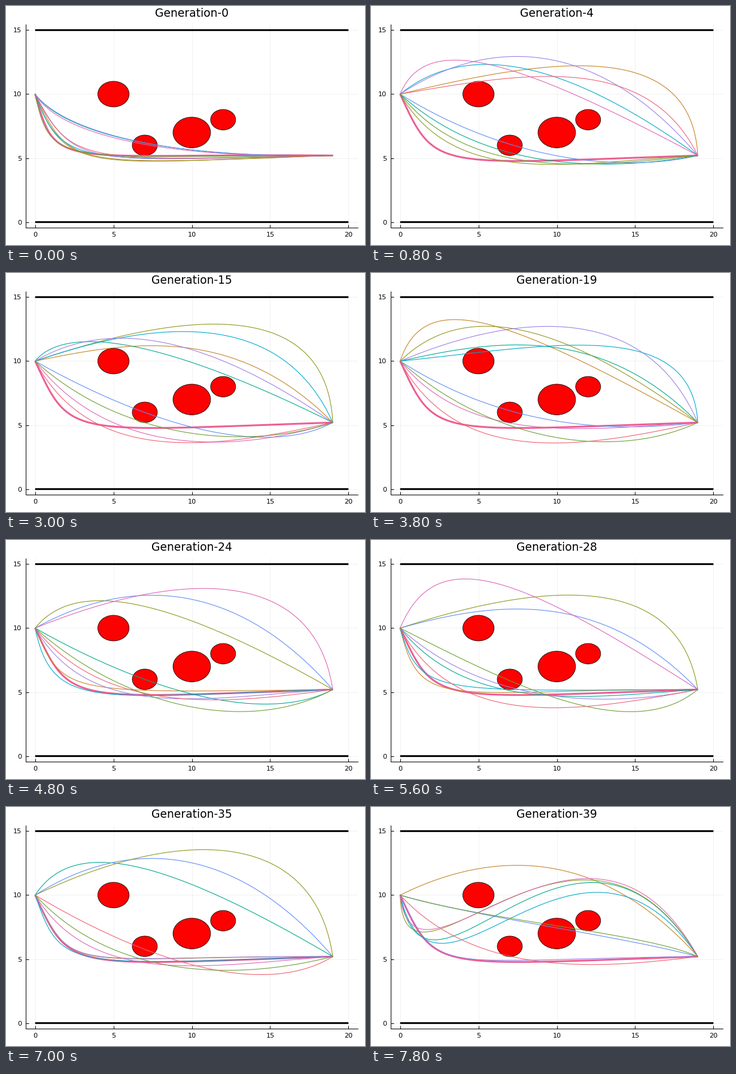
A matplotlib script for the animation above (8 s loop, 600 px wide and 400 px high).

```python
import numpy as np
import matplotlib.pyplot as plt
from matplotlib.animation import FuncAnimation
from matplotlib.patches import Circle

W, H, DPI = 600, 400, 100
GENERATIONS, STEP_MS = 40, 200
START, GOAL = (0, 10), (19, 5.2)
OBSTACLES = [(5, 10, 1), (7, 6, 0.8), (10, 7, 1.2), (12, 8, 0.8)]

BEST_COLOR = "#ED5E93"
COLORS = ["#C68225", "#00A98D", "#8E971E", "#00A9CC", "#9B7FE9",
          "#618DF6", "#F06073", "#DD65B6", "#6C9F33"]

# Each path is a cubic curve, given by its inner control points a, b, c, d.
FIRST_BEST = (1.4, 3.9, 1.3, 5.4)
BEST = (2.3, 3.9, 2.0, 4.5)

# Kinds of path: High and Low arcs, Near the best, Gentle, Straight, Wavy.
# A mix names the kind of each colour and holds until the next one.
MIXES = {0: "NGNNNGNGN", 1: "HLLHHLHHL", 8: "LLHHHHLHL", 15: "HHHHHLLLL",
         24: "NLHNLHLHL", 32: "NHHNNHLLL", 37: "HWWWNSLWS"}

# Ranges of the turning point (x, y) of an arc.
ARCS = {"H": ((2.5, 12.4), (11.2, 13.9)), "L": ((9, 15.5), (3.4, 4.9))}

# Lowest and highest control points of the other kinds.
RANGES = {"N": ((0.4, 3.2, 1.5, 4.4), (2.6, 4.8, 3.8, 5.3)),
          "G": ((1.2, 7.2, 6.8, 4.9), (1.5, 7.6, 7.0, 5.0)),
          "S": ((5.0, 8.0, 12.0, 6.8), (5.2, 9.9, 15.8, 9.7)),
          "W": ((0.0, -2.0, 11.0, 18.9), (3.0, 0.5, 12.9, 21.0))}

plt.rcParams["font.family"] = "DejaVu Sans"


def px(n):
    """Pixels to points."""
    return n * 72 / DPI


def bernstein(t):
    u = 1 - t
    return np.array([u ** 3, 3 * u * u * t, 3 * u * t * t, t ** 3])


def arc(kind, x, y):
    """Control points of a path whose highest or lowest point is (x, y)."""
    if kind == "H":
        t, c = 0.36 + 0.006 * x, min(1.1 + 1.55 * x, 18.6)
    else:
        t, c = 0.35 + 0.025 * x, 3.7 + 0.75 * x
    u = 1 - t
    w0, w1, w2, w3 = bernstein(t)
    a = (x - w2 * c - w3 * GOAL[0]) / w1
    # The curve passes y at t, and its slope is zero there.
    b, d = np.linalg.solve(
        [[w1, w2], [u * u - 2 * u * t, 2 * u * t - t * t]],
        [y - w0 * START[1] - w3 * GOAL[1], START[1] * u * u - GOAL[1] * t * t])
    return a, b, c, d


def population(gen):
    rng = np.random.default_rng(100 + gen)
    mix = MIXES[max(g for g in MIXES if g <= gen)]
    turns = {}
    for kind, ((lo, hi), _) in ARCS.items():
        n = mix.count(kind)
        turns[kind] = list(rng.permutation(lo + (hi - lo) * (np.arange(n) + 0.5) / max(n, 1)))
    return [arc(kind, turns[kind].pop(), rng.uniform(*ARCS[kind][1]))
            if kind in ARCS else rng.uniform(*RANGES[kind])
            for kind in mix]


BASIS = bernstein(np.linspace(0, 1, 120))


def curve(path):
    a, b, c, d = path
    return np.array([START, (a, b), (c, d), GOAL]).T @ BASIS


fig = plt.figure(figsize=(W / DPI, H / DPI), dpi=DPI, facecolor="white")
left, right, top, bottom = 33, 588, 30.7, 371.3
ax = fig.add_axes([left / W, 1 - bottom / H, (right - left) / W, (bottom - top) / H])
ax.set_xlim(-0.6, 20.6)
ax.set_ylim(-0.45, 15.45)
ax.set_xticks(range(0, 21, 5))
ax.set_yticks(range(0, 16, 5))
ax.set_axisbelow(True)
ax.grid(color="black", alpha=0.08, linewidth=px(0.7))
ax.tick_params(direction="in", length=px(5), width=px(1), labelsize=px(11.2))
ax.tick_params(axis="x", pad=px(6.5))
ax.tick_params(axis="y", pad=px(7))
ax.spines[["top", "right"]].set_visible(False)
ax.spines[["left", "bottom"]].set_linewidth(px(1))

for y in (0, 15):
    ax.plot([0, 20], [y, y], color="black", linewidth=px(3),
            solid_capstyle="butt", snap=False)
for x, y, r in OBSTACLES:
    ax.add_patch(Circle((x, y), r, facecolor="red", edgecolor="black",
                        linewidth=px(0.8), zorder=2))

best_line, = ax.plot([], [], color=BEST_COLOR, linewidth=px(3),
                     solid_capstyle="butt", zorder=3)
lines = [ax.plot([], [], color=c, linewidth=px(1.1), zorder=4)[0] for c in COLORS]
title = fig.text((left + right) / 2 / W, 1 - 17.6 / H, "", fontsize=px(18.8),
                 ha="center", va="baseline")


def update(gen):
    title.set_text(f"Generation-{gen}")
    best_line.set_data(*curve(FIRST_BEST if gen == 0 else BEST))
    for line, path in zip(lines, population(gen)):
        line.set_data(*curve(path))
    return [title, best_line, *lines]


anim = FuncAnimation(fig, update, frames=GENERATIONS, interval=STEP_MS,
                     init_func=lambda: update(0), repeat=True, repeat_delay=0)
plt.show()
```
